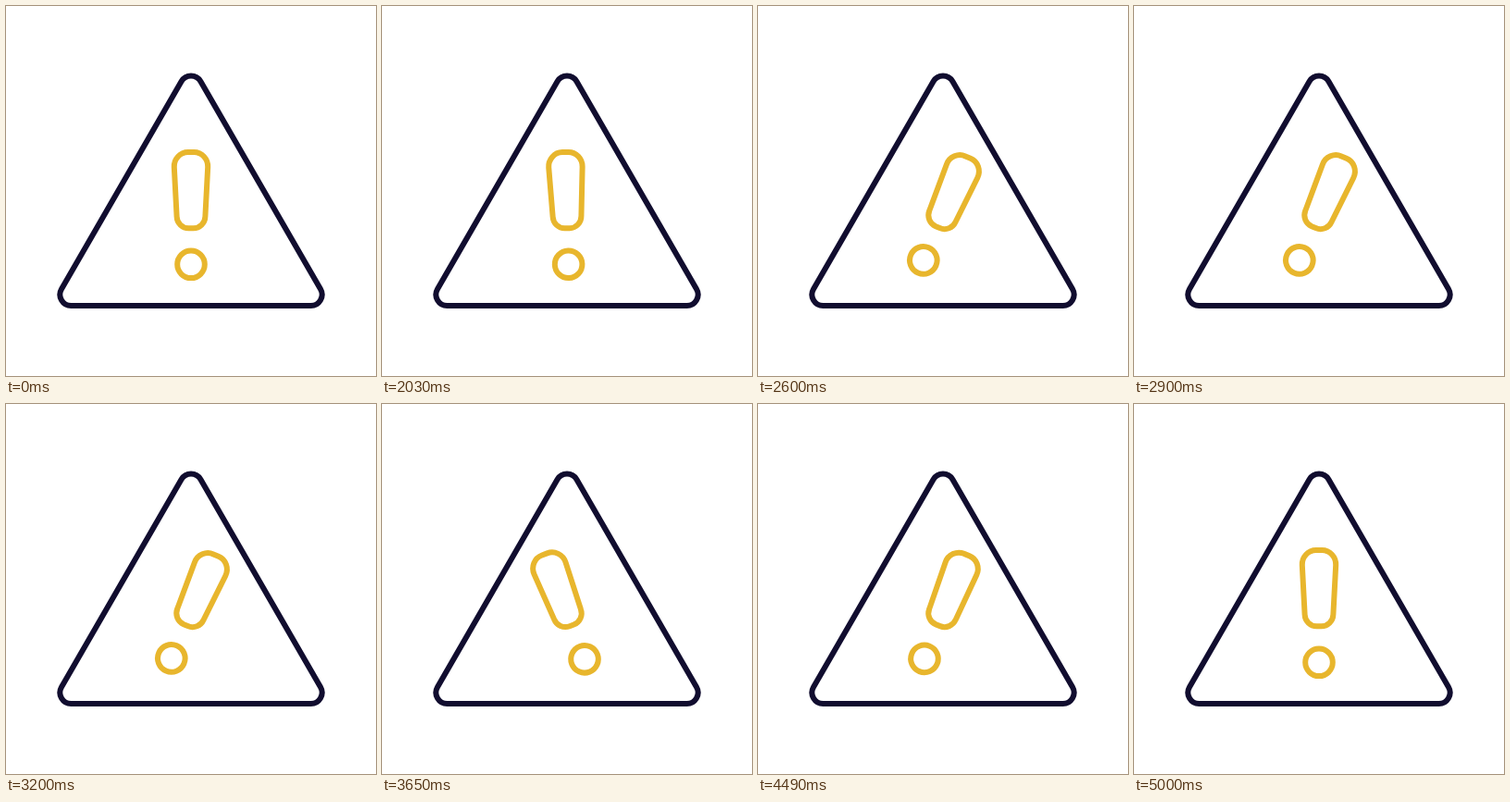
An HTML page without scripts that plays this animation: 400 by 400 pixels, repeating every 5030 ms.

```html
<!DOCTYPE html>
<html lang="en">
<head>
<meta charset="utf-8">
<title>Warning</title>
<style>
@property --n { syntax: "<number>"; inherits: true; initial-value: 0; }

html, body { margin: 0; width: 100%; height: 100%; overflow: hidden; background: #fff; }
svg { display: block; width: 100%; height: 100%; fill: none; stroke-width: 6; stroke-linejoin: round; }

.sign { stroke: #110d2f; }

/* --n counts 30 ms ticks; the angle is lead-in + swing - settle */
.mark {
  stroke: #e8b62d;
  transform-origin: 200px 226px;
  --amp: 28deg;
  --lead: clamp(0, var(--n) / 6.25, 1);
  --m: mod(clamp(0, var(--n) - 6.25, 74.6), 10);
  --u: min(var(--m) / 4.6, 1 + (var(--m) - 4.6) / 5.4);
  --rest: clamp(0, (100 - var(--n)) / 19.15, 1);
  transform: rotate(calc(var(--amp) * (
    (cos(180deg * var(--lead)) - 1) / 2
    + 1 - cos(180deg * var(--u))
    - 1 + var(--rest) * var(--rest))));
  animation: tick 5030ms infinite;
}

@keyframes tick {
  0% { --n: 0; animation-timing-function: step-end; }
  40.357% { --n: 1; animation-timing-function: steps(100); }
  100% { --n: 101; }
}
</style>
</head>
<body>
<svg viewBox="0 0 400 400">
  <path class="sign" d="M189.6 81.5A12 12 0 0 1 210.4 81.5L340 306A12 12 0 0 1 329.6 324H70.4A12 12 0 0 1 60 306Z"/>
  <g class="mark">
    <path d="M197 158h6a15 15.5 0 0 1 15.2 16.2L215.4 227.5a13 13 0 0 1-13 12.8h-4.8a13 13 0 0 1-13-12.8L181.8 174.2a15 15.5 0 0 1 15.2-16.2Z"/>
    <circle cx="200" cy="279.3" r="14.8"/>
  </g>
</svg>
</body>
</html>
```
